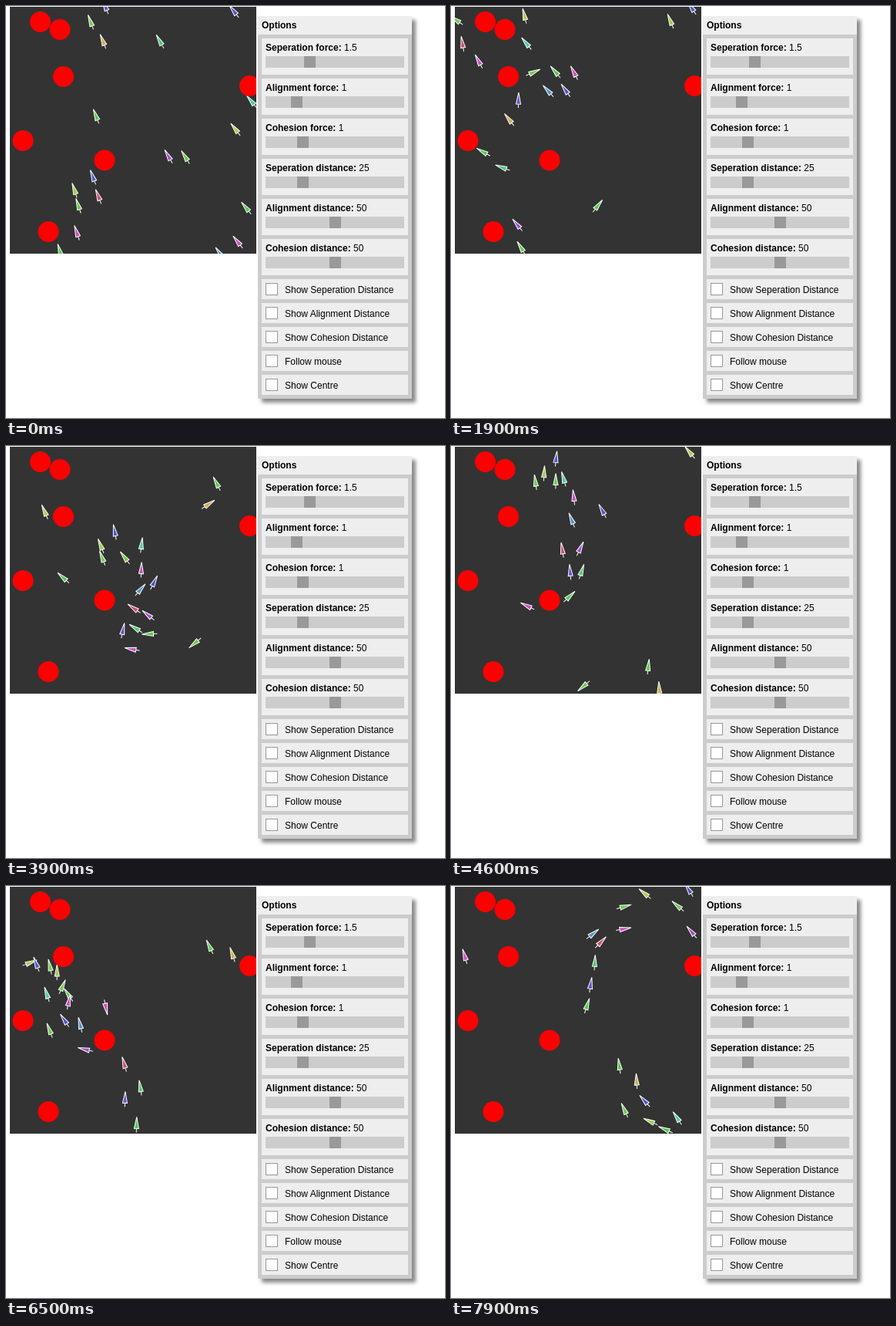
An HTML page for the animation above (8000 ms loop, 570 by 534 pixels).

```html
<!DOCTYPE html>
<html lang="en">
<head>
<meta charset="utf-8">
<title>Flocking</title>
<style>
  html, body { margin: 0; width: 100%; height: 100%; overflow: hidden; background: #fff; }
  svg { display: block; width: 570px; height: 534px; }
  text { font: 12px "Liberation Sans", Arial, sans-serif; fill: #000; }
  .bold { font-weight: bold; }
  .panel { fill: #ccc; filter: drop-shadow(5px 5px 2.5px #888); }
  .boid { stroke: #fff; stroke-width: 1; }
</style>
</head>
<body>
<svg viewBox="0 0 570 534">
  <defs><clipPath id="world"><rect x="5" y="1" width="320" height="320"/></clipPath></defs>
  <g clip-path="url(#world)">
    <rect x="5" y="1" width="320" height="320" fill="#333"/>
    <g id="flock"></g>
    <g id="obstacles" fill="#f00"></g>
  </g>
  <g id="options"></g>
</svg>
<script>
const LOOP = 8000, STEP = 100, SUBSTEPS = 4;
const SIZE = 320, LEFT = 5, TOP = 1;
const SEPARATION = 25, NEIGHBOURS = 50, AVOID = 32, STEER = 0.05;

const starts = [
  [129, 1], [110, 21], [126, 46], [200, 46], [296, 7], [319, 124], [117, 143],
  [298, 160], [211, 195], [233, 196], [113, 222], [89, 239], [94, 259],
  [120, 247], [92, 294], [312, 262], [301, 306], [70, 318], [278, 321]
];
const obstacles = [[44.5, 20.5], [70, 30.5], [74.5, 91.5], [316.5, 103.5], [22, 174.5], [128, 200], [55, 292.5]];
const sliders = [
  ['Seperation force:', 1.5, 5], ['Alignment force:', 1, 5], ['Cohesion force:', 1, 4],
  ['Seperation distance:', 25, 100], ['Alignment distance:', 50, 100], ['Cohesion distance:', 50, 100]
];
const checks = ['Show Seperation Distance', 'Show Alignment Distance', 'Show Cohesion Distance', 'Follow mouse', 'Show Centre'];

function add(parent, tag, attrs, text) {
  const node = document.createElementNS('http://www.w3.org/2000/svg', tag);
  for (const key in attrs) node.setAttribute(key, attrs[key]);
  if (text) node.textContent = text;
  return parent.appendChild(node);
}
const byId = id => document.getElementById(id);
const box = (x, y, width, height, fill) => add(byId('options'), 'rect', { x, y, width, height, fill });
const label = (x, y, text, weight = '') => add(byId('options'), 'text', { x, y, class: weight }, text);

function buildPanel() {
  box(327, 13, 200, 496, '#ccc').setAttribute('class', 'panel');
  box(327, 13, 200, 24, '#eee');
  label(332, 29, 'Options', 'bold');
  sliders.forEach(([name, value, max], i) => {
    const y = 42 + 52 * i;
    box(332, y, 190, 47, '#eee');
    const line = label(337, y + 16, '');
    add(line, 'tspan', { class: 'bold' }, name);
    add(line, 'tspan', {}, ' ' + value);
    box(337, y + 23, 180, 15, '#ccc');
    box(337 + Math.round(165 * value / max), y + 23, 15, 15, '#999');
  });
  checks.forEach((name, i) => {
    const y = 354 + 31 * i;
    box(332, y, 190, 26, '#eee');
    box(337.5, y + 5.5, 15, 15, '#fff').setAttribute('stroke', '#999');
    label(362, y + 18, name);
  });
}

let seed = 7;
function random() {
  seed = (seed * 16807) % 2147483647;
  return seed / 2147483647;
}

const wrap = (value, start) => ((value - start) % SIZE + SIZE) % SIZE + start;
const shortest = d => d - SIZE * Math.round(d / SIZE);
const unit = ([x, y]) => {
  const length = Math.hypot(x, y) || 1;
  return [x / length, y / length];
};

// Boids further right start out flying more to the left.
function launch([x, y]) {
  const angle = -(100 + 30 * x / SIZE) * Math.PI / 180;
  return { x, y, vx: Math.cos(angle), vy: Math.sin(angle), speed: 11 + 4 * random() };
}

function steer(boid, flock) {
  const apart = [0, 0], along = [0, 0], together = [0, 0], clear = [0, 0];
  const push = (sum, x, y, weight = 1) => { sum[0] += x * weight; sum[1] += y * weight; };
  for (const other of flock) {
    if (other === boid) continue;
    const dx = shortest(other.x - boid.x), dy = shortest(other.y - boid.y);
    const distance = Math.hypot(dx, dy);
    if (distance < SEPARATION) push(apart, dx, dy, -1 / (distance * distance + 1));
    if (distance < NEIGHBOURS) {
      push(along, other.vx, other.vy);
      push(together, dx, dy);
    }
  }
  for (const [x, y] of obstacles) {
    const dx = shortest(boid.x - x), dy = shortest(boid.y - y);
    const distance = Math.hypot(dx, dy);
    if (distance < AVOID) push(clear, dx, dy, 8 / distance * (1 - distance / AVOID));
  }
  const total = [0, 0];
  push(total, ...unit(apart), 1.5);
  push(total, ...unit(along));
  push(total, ...unit(together));
  push(total, ...clear, 1.5);
  push(total, random() - 0.5, random() - 0.5, 2);
  return unit([boid.vx + STEER * total[0], boid.vy + STEER * total[1]]);
}

function advance(flock) {
  return flock.map(boid => {
    const [vx, vy] = steer(boid, flock), pace = boid.speed / SUBSTEPS;
    return { ...boid, vx, vy, x: wrap(boid.x + vx * pace, LEFT), y: wrap(boid.y + vy * pace, TOP) };
  });
}

// The whole flight is worked out once, so each picture depends on time alone.
function simulate() {
  const flight = [starts.map(launch)];
  while (flight.length < LOOP / STEP) {
    let flock = flight[flight.length - 1];
    for (let i = 0; i < SUBSTEPS; i++) flock = advance(flock);
    flight.push(flock);
  }
  return flight;
}

buildPanel();
obstacles.forEach(([cx, cy]) => add(byId('obstacles'), 'circle', { cx, cy, r: 13.5 }));
const flight = simulate();
const nodes = starts.map(() => {
  const fill = `hsl(${360 * random()} 55% 55%)`;
  return add(byId('flock'), 'path', { class: 'boid', fill, d: 'M10 0L-5 3V-3ZM-5 0H-10' });
});

function draw(time) {
  flight[Math.floor(time % LOOP / STEP)].forEach(({ x, y, vx, vy }, i) => {
    const angle = Math.atan2(vy, vx) * 180 / Math.PI;
    nodes[i].setAttribute('transform', `translate(${x} ${y}) rotate(${angle})`);
  });
}

const start = performance.now();
function tick() {
  draw(performance.now() - start);
  requestAnimationFrame(tick);
}
tick();
</script>
</body>
</html>
```
